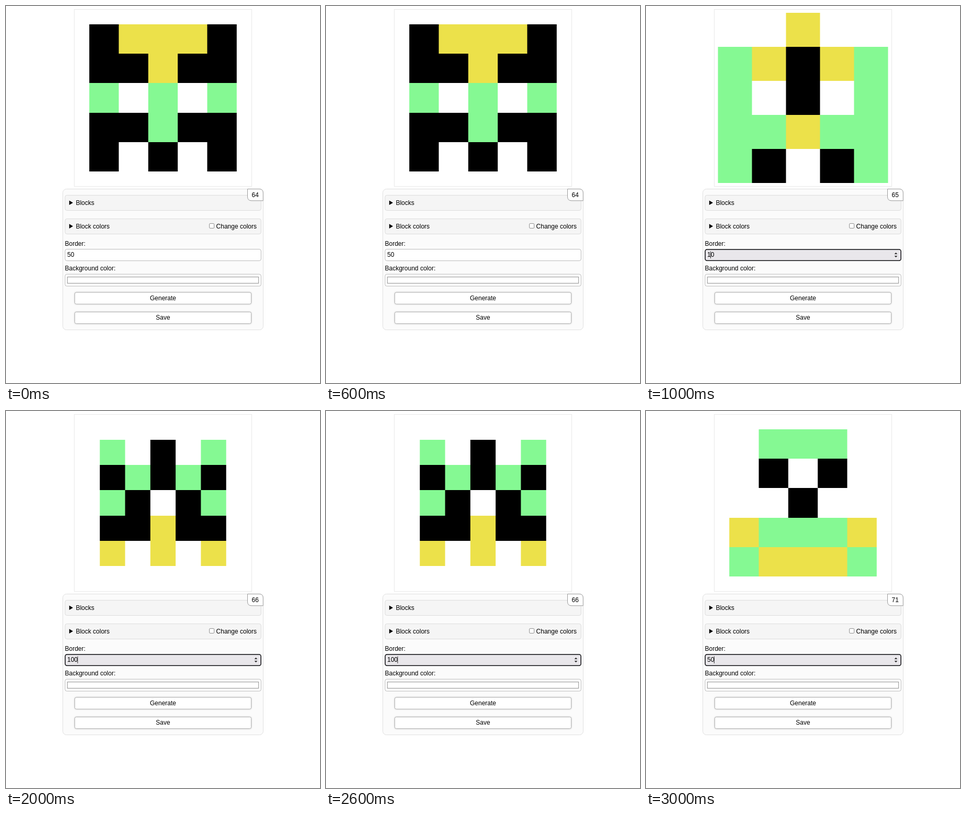
Animation, 600 px wide and 720 px high, one loop 4 s. Source, as an HTML page:

```html
<!DOCTYPE html>
<html lang="en">
<head>
<meta charset="utf-8">
<title>Block avatar generator</title>
<style>
html, body { margin: 0; width: 100%; height: 100%; overflow: hidden; background: #fff }
svg { display: block }
text { font: 12px "Liberation Sans", Arial, sans-serif; fill: #000 }
.mid { text-anchor: middle }
.fold { fill: #f5f5f5; stroke: #dcdcdc }
.field { fill: #fff; stroke: #bbb }
.button { fill: #fff; stroke: #b0b0b0; filter: drop-shadow(0 0 1.5px #0003) }
</style>
</head>
<body>
<svg width="600" height="720" viewBox="0 0 600 720">
  <rect x="130.5" y="6.5" width="339" height="338" fill="#fff" stroke="#e8e8e8"/>
  <g id="art"></g>

  <rect x="108.5" y="349.5" width="383" height="269" rx="7" fill="#fbfbfb" stroke="#e0e0e0"/>
  <rect class="fold" x="112.9" y="361.4" width="374.4" height="29" rx="3.5"/>
  <rect class="fold" x="112.9" y="406.4" width="374.4" height="29" rx="3.5"/>
  <path d="M120.8 371.5l7.2 4.3-7.2 4.3zM120.8 416.3l7.2 4.3-7.2 4.3z"/>
  <text x="133.4" y="380">Blocks</text>
  <text x="133.4" y="425">Block colors</text>
  <rect x="388.7" y="415.4" width="9" height="9" rx="1.5" fill="#fff" stroke="#808080" stroke-width=".9"/>
  <text x="401.6" y="425">Change colors</text>

  <path d="M461.5 349.5H484Q491.3 349.5 491.3 357V371.8H469Q461.5 371.8 461.5 364Z" fill="#fff" stroke="#999"/>
  <text class="mid" id="count" x="476.3" y="365"></text>

  <text x="112.5" y="458">Border:</text>
  <rect class="field" x="112.9" y="464.5" width="374.4" height="22" rx="3.5"/>
  <g id="focus">
    <rect x="113.1" y="465" width="374" height="21.2" rx="3.5" fill="#e9e7eb" stroke="#101014" stroke-width="1.5"/>
    <path d="M474.6 474l2.9-3.2 2.9 3.2zM474.6 477l2.9 3.2 2.9-3.2z" fill="#333"/>
    <rect id="caret" y="468.5" width=".8" height="13.5"/>
  </g>
  <text id="border" x="117" y="479"></text>

  <text x="112.5" y="505">Background color:</text>
  <rect class="field" x="112.9" y="512.2" width="374.4" height="22.8" rx="3.5"/>
  <rect x="117.3" y="517.5" width="365.4" height="12" fill="#fff" stroke="#909090"/>

  <rect class="button" x="131.4" y="547" width="337.2" height="22.2" rx="3"/>
  <text class="mid" x="300" y="562">Generate</text>
  <rect class="button" x="131.4" y="584.4" width="337.2" height="22.2" rx="3"/>
  <text class="mid" x="300" y="599">Save</text>
</svg>
<script>
const $ = id => document.getElementById(id);
const colors = { K: '#000', Y: '#ece14a', G: '#85f993', W: '#fff' };
// Rows hold the left half plus the middle column; the rest is mirrored.
const scenes = [
  { count: 64, border: 50, rows: 'KYY KKY GWG KKG KWK' },
  { count: 65, border: 10, caret: 1, rows: 'WWY GYK GWK GGY GKW' },
  { count: 66, border: 100, caret: 3, rows: 'GWK KGK GKW KKY YWY' },
  { count: 71, border: 50, caret: 2, rows: 'WGG WKW WWK YGG GYY' }
];
const left = 131, top0 = 6.6, size = 338;

function drawArt({ border, rows }) {
  const scale = size / (500 + 2 * border), pos = i => (border + 100 * i) * scale;
  let out = '';
  rows.split(' ').forEach((row, j) => {
    const y = Math.round(top0 + pos(j)), h = Math.round(top0 + pos(j + 1)) - y;
    // Each cell runs to the right edge and is covered by the next, so no seams show.
    [...row, row[1], row[0], 'W'].forEach((c, i) => {
      const x = left + pos(i);
      out += `<rect x="${x}" y="${y}" width="${left + size - x}" height="${h}" fill="${colors[c]}"/>`;
    });
  });
  $('art').innerHTML = out;
}

function show(scene) {
  drawArt(scene);
  $('count').textContent = scene.count;
  $('border').textContent = scene.border;
  $('focus').style.display = scene.caret ? '' : 'none';
  $('caret').setAttribute('x', 116.5 + 6.67 * (scene.caret || 0));
}

let shown = -1;
const start = performance.now();
function tick() {
  const index = Math.floor((performance.now() - start) / 1000) % scenes.length;
  if (index !== shown) show(scenes[shown = index]);
  requestAnimationFrame(tick);
}
tick();
</script>
</body>
</html>
```
